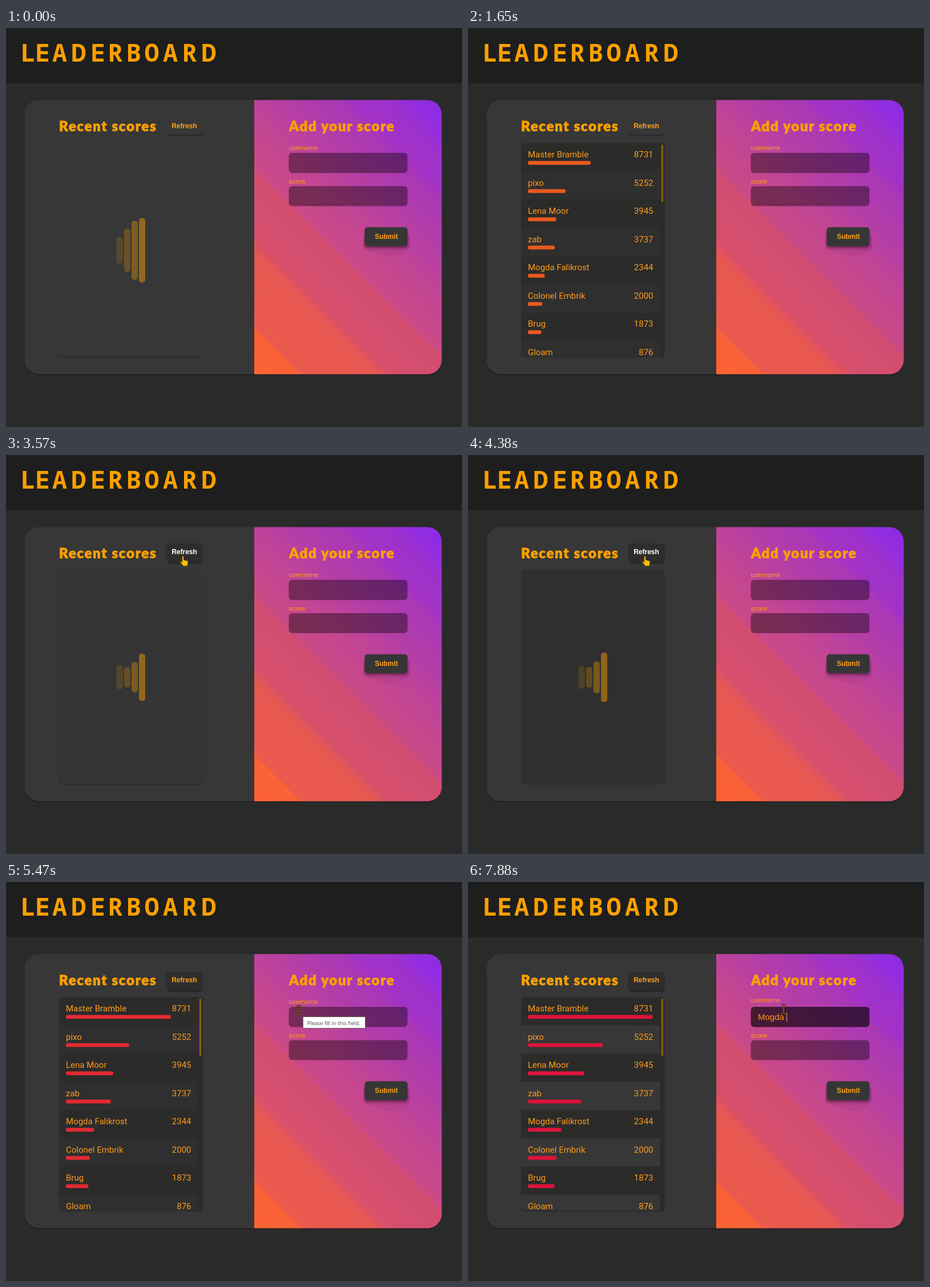
Write an HTML page that moves like this. It is 799 px wide and 700 px high and loops after 8 s.

```html
<!DOCTYPE html>
<html lang="en">
<head>
<meta charset="utf-8">
<title>Leaderboard</title>
<style>
  html, body { margin: 0; height: 100%; overflow: hidden; background: #2a2a2a; }
  svg { display: block; width: 799px; height: 700px; }
  text { fill: #ff9c1a; white-space: pre; font: 15px Roboto, sans-serif; }
  .title { fill: #faa000; font: 600 43.4px "Noto Sans Mono", monospace; text-anchor: middle; }
  .heading { fill: #faa000; stroke: #faa000; stroke-width: .8; font: 900 24px Lato, sans-serif; letter-spacing: 1.7px; }
  .label { font-size: 11.6px; }
  .button { fill: #ffa01a; font: bold 12px "Liberation Sans", Arial, sans-serif; text-anchor: middle; }
  .typed { font: 15px "Liberation Sans", Arial, sans-serif; }
  .tip { fill: #484848; font: 9.3px "Open Sans", sans-serif; }
  .score { text-anchor: end; }
  .edge { fill: none; stroke: #282828; stroke-width: 1.3; }
  .raised { filter: drop-shadow(0 3px 1.5px rgba(0, 0, 0, .35)); }
</style>
</head>
<body>
<svg viewBox="0 0 799 700">
  <defs>
    <linearGradient id="sunset" gradientUnits="userSpaceOnUse" x1="435" y1="608" x2="840" y2="203">
      <stop offset="0" stop-color="#fd6333"/>
      <stop offset=".1" stop-color="#f96138"/>
      <stop offset=".105" stop-color="#ea5a4d"/>
      <stop offset=".26" stop-color="#e75852"/>
      <stop offset=".3" stop-color="#d64f6d"/>
      <stop offset=".444" stop-color="#d24d72"/>
      <stop offset=".448" stop-color="#ca4a85"/>
      <stop offset=".56" stop-color="#c24594"/>
      <stop offset=".68" stop-color="#b23da9"/>
      <stop offset=".785" stop-color="#a937b8"/>
      <stop offset=".795" stop-color="#a333c5"/>
      <stop offset=".88" stop-color="#9e31cc"/>
      <stop offset=".93" stop-color="#932de0"/>
      <stop offset="1" stop-color="#8a2be2"/>
    </linearGradient>
    <clipPath id="listShape"><rect x="93" y="202" width="251.5" height="376" rx="6"/></clipPath>
  </defs>

  <rect width="799" height="97" fill="#1e1e1e"/>
  <text class="title" x="38.5 64 94 127.5 161 191.5 223.5 255.5 288 321.5 355.5" y="59">LEADERBOARD</text>

  <rect x="32.5" y="128.5" width="731" height="480.5" rx="25" fill="#1b1b1b"/>
  <rect x="32.5" y="126.5" width="731" height="481" rx="25" fill="#373737"/>
  <path d="M435 126.5h303.5a25 25 0 0 1 25 25v431a25 25 0 0 1-25 25h-303.5z" fill="url(#sunset)"/>

  <text class="heading" x="93" y="181">Recent scores</text>
  <path class="edge" style="stroke-width:2" d="M282 184q1 4 6 4h50q5 0 6-4"/>
  <g id="refresh">
    <g id="refreshBox">
      <rect x="282" y="160" width="62" height="33" rx="6" fill="#272727"/>
      <rect x="280" y="157" width="65" height="33" rx="6" fill="#2d2d2d"/>
    </g>
    <text id="refreshText" class="button" x="312.5" y="176">Refresh</text>
  </g>

  <path class="edge" d="M93 572q1 5.5 6 5.5h239q5 0 6-5.5"/>
  <rect id="listBack" x="93" y="202" width="252" height="376" rx="6" fill="#2f2f2f"/>
  <g id="list" clip-path="url(#listShape)">
    <rect x="336" y="202" width="9" height="376" fill="#2b2b2b"/>
    <rect x="338.7" y="204.5" width="3.4" height="101" rx="1.7" fill="#8c5b08"/>
  </g>
  <g id="loader"><rect id="loaderBack" x="194" y="333.5" width="50" height="112.5" fill="#2f2f2f"/></g>

  <text class="heading" x="496" y="181">Add your score</text>
  <text id="userLabel" class="label" x="495.5">username</text>
  <rect id="userField" x="495.5" y="219" width="208" height="35.5" rx="6"/>
  <text class="label" x="495.5" y="273">score</text>
  <rect x="495.5" y="277.5" width="208" height="35" rx="6" fill-opacity=".4"/>
  <text id="typed" class="typed" x="508" y="242"></text>
  <rect id="caret" y="229" width="1" height="16" fill="#e8a860"/>

  <rect x="626" y="360" width="82" height="30" rx="8" fill-opacity=".12"/>
  <path d="M630 390h76l-15 8-20 4z" fill-opacity=".05"/>
  <rect class="raised" x="628.5" y="349.5" width="75" height="33" rx="5" fill="#363636"/>
  <text class="button" x="666.5" y="370">Submit</text>

  <g id="tooltip">
    <rect x="520.5" y="236.5" width="109" height="20" fill="#fff" stroke="#666"/>
    <text class="tip" x="527.5" y="250.5">Please fill in this field.</text>
  </g>

  <g id="cursor" stroke-linejoin="round">
    <path id="arrow" d="M0 0v14l3.5-3 2.5 5 2-1-2.4-5H10z" fill="#f9b800" stroke="#222" stroke-width=".8"/>
    <path id="hand" d="M-1.5 1q1.5-2 3 0v6l6 1.5q2 .6 1.6 3l-1.2 6.5h-7l-5.5-6.5q-1-2 1-2l2.1 1.7z"
      fill="#ffbe00" stroke="#222" stroke-width=".8"/>
    <g id="beam" fill="none">
      <path d="M-4-7.5h3l1 1 1-1h3M0-6.5v13M-4 7.5h3l1-1 1 1h3" stroke="#2a1a10" stroke-width="2.6"/>
      <path d="M-4-7.5h3l1 1 1-1h3M0-6.5v13M-4 7.5h3l1-1 1 1h3" stroke="#c99a00" stroke-width=".9"/>
    </g>
  </g>
</svg>

<script>
const LOOP = 8000, STEP = 91.4;
const FIRST_LIST = 1410, CLICK = 3375, SECOND_LIST = 5004, LEAVE = 5090, FOCUS = 6090;
const ROW = 49.5, BAR_MAX = 219, GOLD = [249, 160, 0], CRIMSON = [220, 20, 60];
const players = [
  ["Master Bramble", 8731], ["pixo", 5252], ["Lena Moor", 3945], ["zab", 3737],
  ["Mogda Falikrost", 2344], ["Colonel Embrik", 2000], ["Brug", 1873], ["Gloam", 876],
];
const entry = "Mogda ", keyTimes = [7200, 7380, 7475, 7580, 7760, 7855];
// time, x, y of the pointer's hot spot
const route = [
  [1740, 460, 24], [2200, 385, 106], [2470, 304, 160], [2650, 291, 179], [2960, 310, 177],
  [5004, 310, 177], [5400, 513, 225], [6090, 513, 225], [6400, 553, 223],
];

const $ = id => document.getElementById(id);
const clamp = v => Math.min(1, Math.max(0, v));
const ramp = (t, from, to) => clamp((t - from) / (to - from));
const mix = (a, b, p) => a + (b - a) * p;
const show = (id, on) => $(id).style.display = on ? "" : "none";

function add(parent, tag, attrs, content = "") {
  const node = document.createElementNS("http://www.w3.org/2000/svg", tag);
  for (const key in attrs) node.setAttribute(key, attrs[key]);
  node.textContent = content;
  return parent.appendChild(node);
}

const bars = players.map(([name, score], i) => {
  const y = 202 + i * ROW, list = $("list");
  if (i % 2 === 0) add(list, "rect", { x: 93, y, width: 243, height: ROW, fill: "#2b2b2a" });
  add(list, "text", { x: 105, y: y + 25 }, name);
  add(list, "text", { x: 324.5, y: y + 25, class: "score" }, score);
  return add(list, "rect", { x: 105, y: y + 31.2, height: 6.8, rx: 3 });
});

const pulses = [.16, .25, .36, .47].map((alpha, i) =>
  add($("loader"), "rect", { x: 193.7 + i * 13.1, width: 11, rx: 5, fill: "#faa000", "fill-opacity": alpha }));

function pointerAt(t) {
  const next = route.findIndex(point => point[0] > t);
  if (next < 0) return route.at(-1).slice(1);
  const [t0, x0, y0] = route[Math.max(0, next - 1)], [t1, x1, y1] = route[next];
  const p = ramp(t, t0, t1);
  return [mix(x0, x1, p), mix(y0, y1, p)];
}

function drawList(t) {
  const start = t < CLICK ? FIRST_LIST : SECOND_LIST;
  const loaded = t >= FIRST_LIST && t < CLICK || t >= SECOND_LIST;
  const grow = 1 - (1 - ramp(t, start, start + 800)) ** 2;
  const color = `rgb(${GOLD.map((c, i) => Math.round(mix(c, CRIMSON[i], grow)))})`;
  show("list", loaded);
  show("loader", !loaded);
  bars.forEach((bar, i) => {
    bar.setAttribute("width", BAR_MAX * players[i][1] / players[0][1] * grow);
    bar.setAttribute("fill", color);
  });
  const dark = loaded ? 1 - ramp(t, start + 500, start + 900) : ramp(t, CLICK, CLICK + 600);
  $("listBack").setAttribute("opacity", dark);
  $("loaderBack").setAttribute("opacity", t < FIRST_LIST ? ramp(t, 600, 1000) : 0);

  const phase = t * 2 * Math.PI / 810 + (t < CLICK ? -2.33 : 0);
  pulses.forEach((bar, i) => {
    const height = 74 + 39 * Math.cos(phase + i * .81);
    bar.setAttribute("y", 390 - height / 2);
    bar.setAttribute("height", height);
  });
}

function drawPointer(t) {
  const [x, y] = pointerAt(t), hover = t >= 2540 && t < LEAVE, inField = t >= 5360;
  show("cursor", t >= 1720);
  show("hand", hover);
  show("beam", inField);
  show("arrow", !hover && !inField);
  $("cursor").setAttribute("transform", `translate(${x} ${y})`);
  $("refreshText").style.fill = hover ? "#fff" : "";
  $("refresh").setAttribute("transform", `translate(0 ${t >= CLICK && t < LEAVE ? -2 : 0})`);
  show("refreshBox", t >= CLICK);
  show("tooltip", t >= 5440 && t < 5805);
}

function drawForm(t) {
  const focus = ramp(t, FOCUS, 6400);
  $("userLabel").setAttribute("y", mix(214, 210.5, focus));
  $("userField").setAttribute("fill-opacity", mix(.4, .64, focus));
  $("typed").textContent = entry.slice(0, keyTimes.filter(key => t >= key).length);
  $("caret").setAttribute("x", 508 + $("typed").getComputedTextLength());
  show("caret", t >= FOCUS && t < 6640 || t >= keyTimes[0]);
}

function draw() {
  const t = Math.floor((performance.now() % LOOP + 20) / STEP) * STEP;
  drawList(t);
  drawPointer(t);
  drawForm(t);
  requestAnimationFrame(draw);
}
draw();
</script>
</body>
</html>
```
